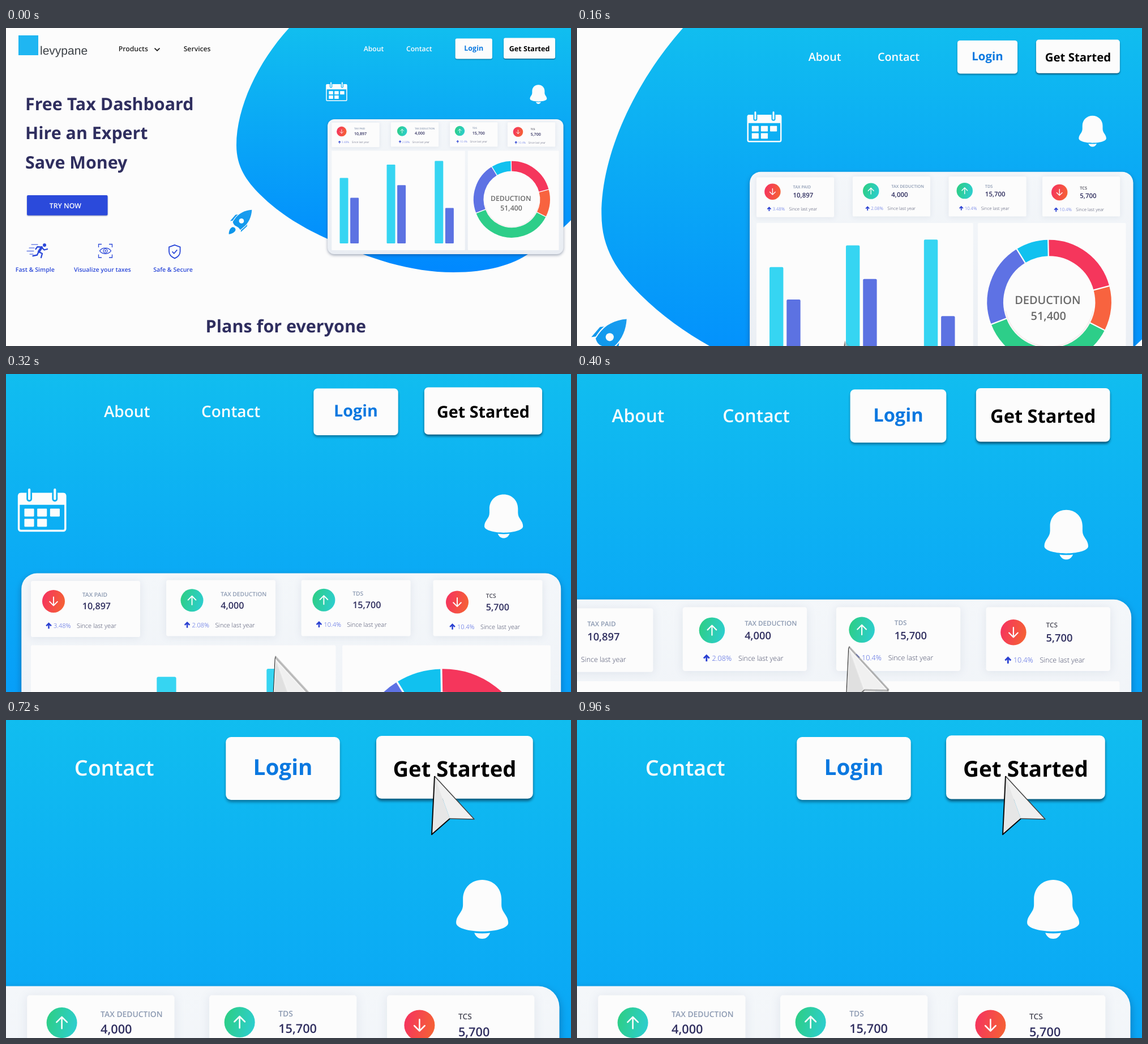
An HTML page with a canvas that plays this animation: 998 px wide and 561 px high, repeating every 1.04 s.

```html
<!DOCTYPE html>
<html lang="en">
<head>
<meta charset="utf-8">
<title>Tax dashboard</title>
<style>
html, body { margin: 0; width: 100%; height: 100%; overflow: hidden; background: #fcfcfc; }
canvas { display: block; }
</style>
</head>
<body>
<canvas id="stage" width="998" height="561"></canvas>
<script>
const W = 998, H = 561, LOOP = 1040, STEP = 40, SHUTTER = 20;
const stage = document.getElementById('stage').getContext('2d');
const smear = document.createElement('canvas');
smear.width = W;
smear.height = H;
const blur = smear.getContext('2d');

const PAPER = '#fcfcfc', NAVY = '#2f2e5f', ROYAL = '#2b48d9';
const FOCUS = { x: 988, y: 13 };
const ZOOM = [[0, 1], [80, 1.277], [240, 1.975], [400, 2.6], [520, 3.085]];
const POINTER = [
  [80, 472, 620], [120, 472, 578], [160, 473, 552], [200, 473, 535], [240, 474, 522],
  [320, 476, 497], [400, 481, 480], [440, 487, 466], [480, 503, 438], [500, 518, 412],
  [520, 541, 380], [540, 569, 341], [560, 594, 307], [600, 650, 237], [640, 705, 166],
  [680, 745, 112], [700, 757, 99]
];
const CARDS = [
  { x: 575.3, y: 166.9, cx: 592.8, cy: 182.6, name: 'TAX PAID', value: '10,897', rate: '3.48%' },
  { x: 679.8, y: 166.2, cx: 699.7, cy: 181.9, name: 'TAX DEDUCTION', value: '4,000', rate: '2.08%', up: true },
  { x: 784.1, y: 166.2, cx: 801.5, cy: 181.6, name: 'TDS', value: '15,700', rate: '10.4%', up: true },
  { x: 885.9, y: 166.2, cx: 904.5, cy: 183.3, name: 'TCS', value: '5,700', rate: '10.4%', ink: '#4b4b58' }
];
const BARS = [[589.5, 264.4, 299.6], [672.5, 240.9, 277.3], [757.3, 234.6, 317.6]];
const SLICES = [
  [-1, 75, '#f5365c'], [75, 117, '#f8633f'], [117, 249, '#2dce89'],
  [249, 328.4, '#5e72e4'], [328.4, 359, '#11c1ef']
];

let c = stage, zoom = 1;

// Linear interpolation through rows of [time, ...values]
function track(keys, t) {
  if (t <= keys[0][0]) return keys[0].slice(1);
  for (let i = 1; i < keys.length; i++) {
    const a = keys[i - 1], b = keys[i];
    if (t <= b[0]) {
      const k = (t - a[0]) / (b[0] - a[0]);
      return a.slice(1).map((v, j) => v + (b[j + 1] - v) * k);
    }
  }
  return keys[keys.length - 1].slice(1);
}

// x is the left edge or the centre, y the middle of the capitals
function text(str, x, y, size, weight, color, align = 'center') {
  c.font = `${weight} ${size}px "Open Sans", sans-serif`;
  c.textAlign = align;
  c.fillStyle = color;
  c.fillText(str, x, y + size * 0.357);
}

function box(x, y, w, h, r, fill) {
  c.beginPath();
  c.roundRect(x, y, w, h, r);
  c.fillStyle = fill;
  c.fill();
}

function shade(color, dy, size, draw) {
  c.save();
  c.shadowColor = color;
  c.shadowOffsetY = dy * zoom;
  c.shadowBlur = size * zoom;
  draw();
  c.restore();
}

function line(d, color, width) {
  c.strokeStyle = color;
  c.lineWidth = width;
  c.stroke(new Path2D(d));
}

function shape(d, fill) {
  c.fillStyle = fill;
  c.fill(new Path2D(d));
}

function disc(x, y, r, fill) {
  c.beginPath();
  c.arc(x, y, r, 0, Math.PI * 2);
  c.fillStyle = fill;
  c.fill();
}

function ramp(x0, y0, x1, y1, from, to) {
  const g = c.createLinearGradient(x0, y0, x1, y1);
  g.addColorStop(0, from);
  g.addColorStop(1, to);
  return g;
}

function at(x, y, scale, draw) {
  c.save();
  c.translate(x, y);
  c.scale(scale, scale);
  draw();
  c.restore();
}

function blob() {
  shape('M500 0C445 60 407 140 407 207C407 245 425 270 449 294C485 330 530 355 568 372' +
    'C640 407 715 431 790 431C850 431 895 418 925 397C955 378 980 357 998 339V0Z',
    ramp(0, 0, 0, 431, '#11beef', '#0088ff'));
}

function brand() {
  box(22, 13, 35, 35, 0, '#1fb6f2');
  c.font = '21px "Liberation Sans", Arial, sans-serif';
  c.textAlign = 'left';
  c.fillStyle = '#3c4146';
  c.fillText('levypane', 60, 47);
}

function button(x, y, w, h, label, ty, color, depth) {
  shade(`rgba(0,20,40,${depth})`, 1.3, 1.8, () => box(x, y, w, h, 3, PAPER));
  text(label, x + w / 2, ty, 12.55, 700, color);
}

function nav(press) {
  text('Products', 224.8, 36.4, 12.2, 600, '#222');
  line('M262.5 35.7L267 40L271.5 35.7', '#222', 1.8);
  text('Services', 337.6, 36.4, 12.2, 600, '#222');
  text('About', 649.5, 36.2, 12.2, 600, PAPER);
  text('Contact', 729.7, 36.2, 12.2, 600, PAPER);
  button(793.6, 18.5, 65.3, 36, 'Login', 35.7, '#0a78e0', 0.4);
  at(924.6, 35.8, press, () => button(-45.5, -18.2, 91, 36.4, 'Get Started', 0.9, '#000', 0.6));
}

function runner() {
  c.lineCap = c.lineJoin = 'round';
  line('M45 382H56M41 388H50M37 393.5H49M42 399H48', ROYAL, 1.1);
  line('M63 387L58 394.5', ROYAL, 4.2);
  line('M63 387L67.5 391.5L73 390M62 386.5L55.5 386L52.5 390M58.5 395L64 398L62 405M57.5 395L55 400.5L47.5 402', ROYAL, 2.3);
  disc(68, 383, 3, ROYAL);
}

function eye() {
  line('M163.5 387V381.5H169M182 381.5H187.5V387M187.5 399.5V405H182M169 405H163.5V399.5', ROYAL, 1.3);
  line('M165.5 393.2C170 386.5 181 386.5 185.5 393.2C181 400 170 400 165.5 393.2Z', ROYAL, 1.2);
  c.beginPath();
  c.arc(175.5, 393.2, 3.6, 0, 7);
  c.stroke();
  disc(175.5, 393.2, 1.3, ROYAL);
}

function rocket() {
  at(393.6, 320.8, 1 / 1.277, () => {
    const fill = ramp(50, 0, 0, 55, '#1a9df0', '#0b95ea');
    c.lineJoin = 'round';
    shape('M15 11L23 10L11 24L3 25Z', fill);
    shape('M41 37L42 29L28 41L27 50Z', fill);
    shape('M0 55C0 47 3 41 8 39C12 38 16 42 15 46C13 51 7 54 0 55Z', fill);
    const hull = 'M52 0C36 1 22 8 13 21L9 27Q11 35 17 37Q22 39 26 45L32 40C45 30 51 16 52 0Z';
    line(hull, PAPER, 3);
    shape(hull, fill);
    disc(28.5, 25, 5.6, PAPER);
  });
}

function hero() {
  text('Free Tax Dashboard', 34, 134, 30.4, 700, NAVY, 'left');
  text('Hire an Expert', 34, 185.5, 30.4, 700, NAVY, 'left');
  text('Save Money', 34, 237, 30.4, 700, NAVY, 'left');
  shade('rgba(20,30,90,.45)', 1, 2, () => box(37, 295, 142.5, 35.5, 2, '#2b4adb'));
  text('TRY NOW', 104.8, 314, 12.3, 600, PAPER);
  c.save();
  runner();
  c.restore();
  eye();
  line('M298 382.8L307.6 386.3V394C307.6 400 303 404.2 298 406.4C293 404.2 288 400 288 394V386.3Z', ROYAL, 1.8);
  line('M293.6 394.4L296.7 397.7L302.3 391.4', ROYAL, 1.7);
  text('Fast & Simple', 51.3, 426, 10.6, 600, ROYAL);
  text('Visualize your taxes', 170.3, 426, 10.6, 600, ROYAL);
  text('Safe & Secure', 295, 426, 10.6, 600, ROYAL);
  text('Plans for everyone', 494.3, 526, 30.5, 700, NAVY);
}

function calendar() {
  at(565.2, 95.5, 1 / 1.975, () => {
    c.beginPath();
    c.roundRect(1.5, 8.5, 71, 56, 3);
    c.strokeStyle = PAPER;
    c.lineWidth = 3;
    c.stroke();
    box(1, 7, 72, 18, [3, 3, 0, 0], PAPER);
    for (let i = 0; i < 5; i++) {
      box(10 + (i % 3) * 19.6, i < 3 ? 31 : 46.5, 14.8, 12, 1, PAPER);
    }
    c.lineCap = 'round';
    for (const x of [17.5, 56.5]) {
      line(`M${x} 8V16`, '#0eb1f2', 8.5);
      line(`M${x} 2V16`, PAPER, 3.6);
    }
  });
}

function bell() {
  at(940.4, 100.2, 1 / 3.085, () => {
    shape('M-34 34C-34 14 -19 0 0 0C19 0 34 14 34 34V44C34 58 46 62 46 76C46 86 20 91 0 91' +
      'C-20 91 -46 86 -46 76C-46 62 -34 58 -34 44Z', PAPER);
    shape('M-14 93.5Q0 95.5 14 93.5C11 101 6 104 0 104C-6 104 -11 101 -14 93.5Z', PAPER);
  });
}

function card(k) {
  shade('rgba(110,130,170,.16)', 0.5, 6, () => box(k.x, k.y, 84.4, 43.3, 1.6, PAPER));
  at(k.cx, k.cy, 1, () => {
    const [from, to] = k.up ? ['#2dce89', '#2dcecc'] : ['#f5365c', '#f56036'];
    disc(0, 0, 8.75, ramp(-8, -2, 8, 2, from, to));
    c.save();
    if (!k.up) c.scale(1, -1);
    c.lineCap = c.lineJoin = 'round';
    line('M0 3.3V-3.2M-3 -0.3L0 -3.3L3 -0.3', PAPER, 0.85);
    c.restore();
    text(k.name, 22.2, -4.9, 4.5, 600, k.ink || '#8c9ab2', 'left');
    text(k.value, 22.2, 3.7, 7.05, 600, NAVY, 'left');
    line('M-3.7 21.1V17.4M-5.6 19L-3.7 17.1L-1.8 19', '#2a40d2', 1.1);
    text(k.rate, 0, 18.9, 4.85, 300, '#4a60e0', 'left');
    text('Since last year', 17.9, 18.9, 4.8, 300, '#454a68', 'left');
  });
}

function donut() {
  const x = 893.4, y = 302.3, rad = d => (d - 90) * Math.PI / 180;
  for (const [a, b, color] of SLICES) {
    c.beginPath();
    c.arc(x, y, 58.7, rad(a), rad(b));
    c.strokeStyle = color;
    c.lineWidth = 17.6;
    c.stroke();
  }
  c.strokeStyle = PAPER;
  c.lineWidth = 1.4;
  for (const [a] of SLICES) {
    const dx = Math.cos(rad(a)), dy = Math.sin(rad(a));
    c.beginPath();
    c.moveTo(x + dx * 48, y + dy * 48);
    c.lineTo(x + dx * 69, y + dy * 69);
    c.stroke();
  }
  c.beginPath();
  c.arc(x, y, 48.5, 0.2, Math.PI - 0.2);
  c.strokeStyle = '#f7eeee';
  c.stroke();
  text('DEDUCTION', 891.7, 300.2, 12.25, 600, '#6a6a6a');
  text('51,400', 892.5, 317.6, 12.3, 600, '#6a6a6a');
}

function dashboard() {
  shade('rgba(10,30,70,.38)', 2, 5, () =>
    box(568, 161, 416.6, 238, 12, ramp(0, 161, 0, 399, '#f4f7fa', '#e9edf3')));
  CARDS.forEach(card);
  box(575.3, 216.5, 235.4, 175.5, 1.2, PAPER);
  box(815.8, 216.5, 160.8, 175.5, 1.2, PAPER);
  for (const [x, tall, low] of BARS) {
    box(x, tall, 15, 380 - tall, 1.3, '#36d5f2');
    box(x + 18.6, low, 15, 380 - low, 1.3, '#5c72e2');
  }
  donut();
}

function arrow(ctx, x, y) {
  ctx.save();
  ctx.translate(x, y);
  ctx.lineJoin = 'round';
  ctx.fillStyle = '#f0f0f0';
  ctx.fill(new Path2D('M0 0L70 76L27 75Z'));
  ctx.fillStyle = '#e6e6e6';
  ctx.fill(new Path2D('M0 0L27 75L-5 103Z'));
  ctx.strokeStyle = '#444';
  ctx.lineWidth = 1.6;
  ctx.stroke(new Path2D('M0 0L70 76L27 75'));
  ctx.strokeStyle = '#0a0a0a';
  ctx.lineWidth = 2;
  ctx.stroke(new Path2D('M27 75L-5 103L0 0'));
  ctx.restore();
}

// Average the pointer over the open shutter
function pointer(t) {
  if (t <= POINTER[0][0]) return;
  const [x0, y0] = track(POINTER, t - SHUTTER), [x1, y1] = track(POINTER, t);
  if (x0 === x1 && y0 === y1) return arrow(stage, x1, y1);
  const n = 16;
  blur.clearRect(0, 0, W, H);
  blur.globalCompositeOperation = 'lighter';
  blur.globalAlpha = 1 / n;
  for (let i = 0; i < n; i++) {
    const k = i / (n - 1);
    arrow(blur, x0 + (x1 - x0) * k, y0 + (y1 - y0) * k);
  }
  stage.drawImage(smear, 0, 0);
}

function pressAt(t) {
  const k = (t - 690) / 260;
  return k > 0 && k < 1 ? 1 - 0.04 * Math.sin(Math.PI * k) : 1;
}

function render(t) {
  zoom = track(ZOOM, t)[0];
  c.setTransform(1, 0, 0, 1, 0, 0);
  c.textRendering = 'geometricPrecision';
  c.fillStyle = PAPER;
  c.fillRect(0, 0, W, H);
  c.setTransform(zoom, 0, 0, zoom, FOCUS.x * (1 - zoom), FOCUS.y * (1 - zoom));
  blob();
  brand();
  hero();
  rocket();
  calendar();
  bell();
  dashboard();
  nav(pressAt(t));
  c.setTransform(1, 0, 0, 1, 0, 0);
  pointer(t);
}

const start = performance.now();
function tick() {
  const t = (performance.now() - start) % LOOP;
  render(Math.floor(t / STEP) * STEP);
  requestAnimationFrame(tick);
}
tick();
</script>
</body>
</html>
```
